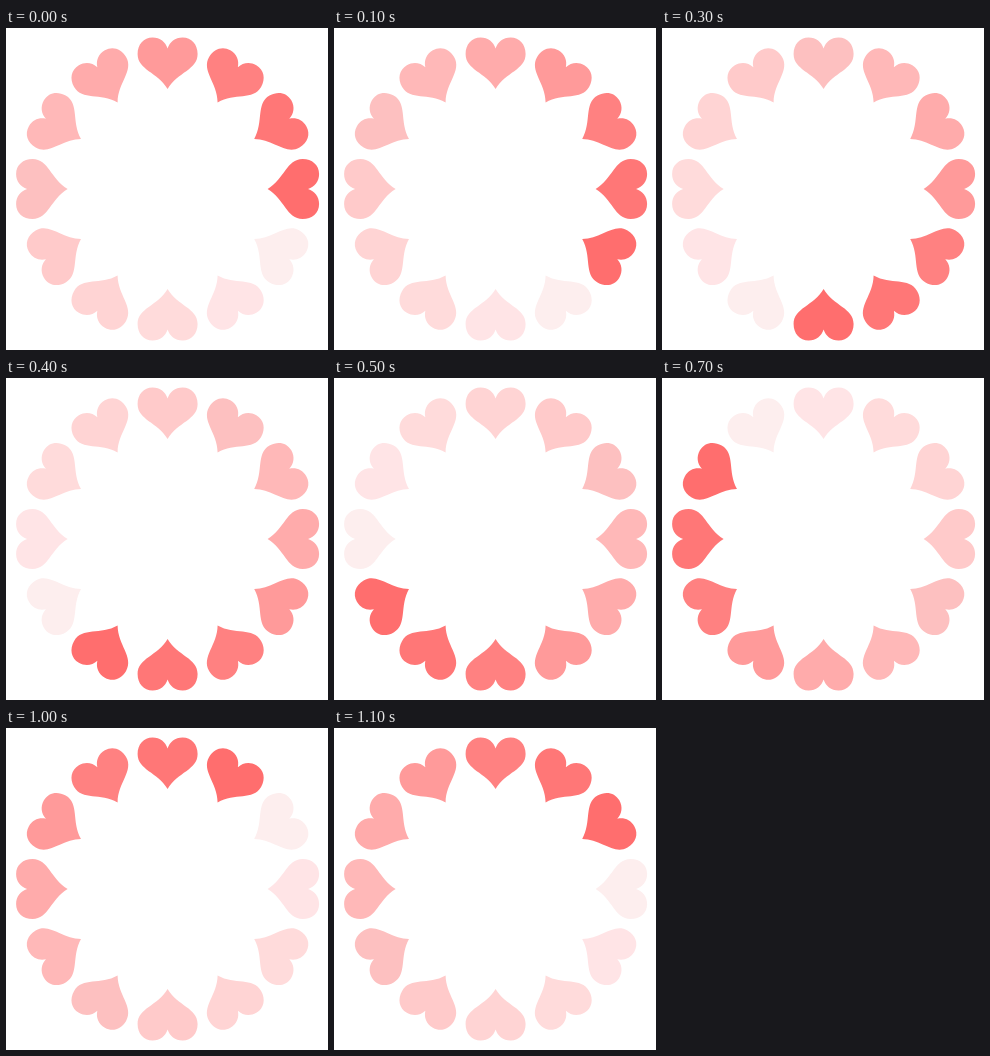
These frames come from a looping animation (322x322 px, 1200 ms). An HTML page with a canvas:

```html
<!DOCTYPE html>
<html lang="en">
<head>
<meta charset="utf-8">
<title>Heart spinner</title>
<style>
  html, body { margin: 0; width: 100%; height: 100%; overflow: hidden; background: #fff; }
  canvas { display: block; width: 322px; height: 322px; }
</style>
</head>
<body>
<canvas id="stage" width="322" height="322"></canvas>
<script>
const ctx = document.getElementById('stage').getContext('2d');
const COUNT = 12, STEP = 100;

// Fill by age, from the leading heart to the faintest
const shades = ['#ff6e6e', '#ff7777', '#ff8181', '#ff9a9a', '#ffabab', '#ffb8b8',
                '#fdc0c0', '#ffcaca', '#ffd4d4', '#ffdbdb', '#ffe4e6', '#fdeeee'];

// Heart with its tip 100 units from the ring's centre
const heart = new Path2D(
  'M0-100C10-117 30-119 30-135C30-144.5 24-151.5 15-151.5C7.5-151.5 2-147 0-140.5' +
  'C-2-147-7.5-151.5-15-151.5C-24-151.5-30-144.5-30-135C-30-119-10-117 0-100Z');

function draw(time) {
  const head = Math.floor(time / STEP) % COUNT;
  ctx.fillStyle = '#fff';
  ctx.fillRect(0, 0, 322, 322);
  for (let i = 0; i < COUNT; i++) {
    ctx.save();
    ctx.translate(161.6, 161);
    ctx.rotate(Math.PI / 2 + i * 2 * Math.PI / COUNT);
    ctx.fillStyle = shades[(head - i + COUNT) % COUNT];
    ctx.fill(heart);
    ctx.restore();
  }
}

const start = performance.now();
function tick() {
  draw(performance.now() - start);
  requestAnimationFrame(tick);
}
tick();
</script>
</body>
</html>
```
